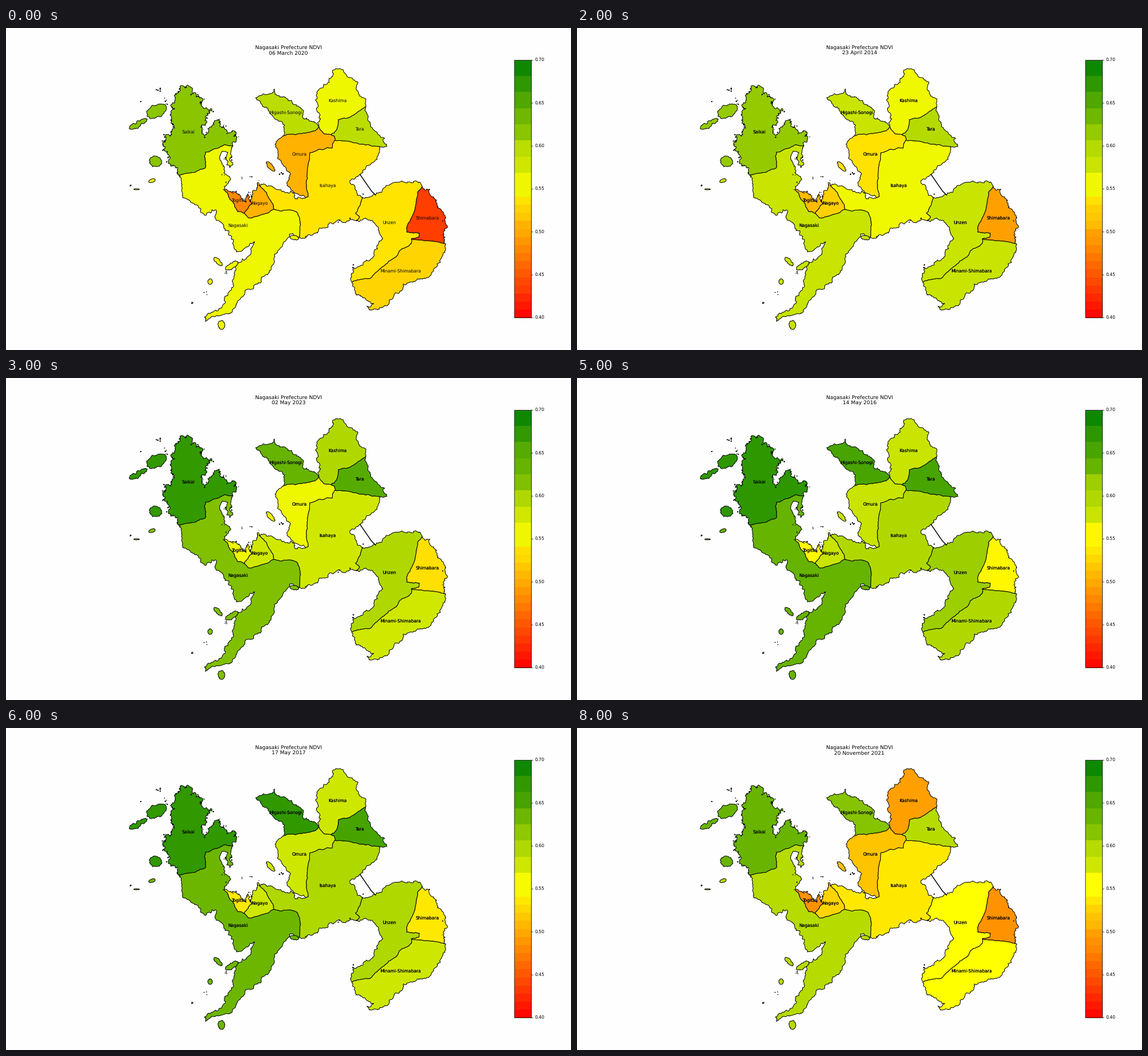
Recreate the animation shown at these times as a matplotlib script. Size 991 by 565 pixels, loop 9 s.

```python
import numpy as np
import matplotlib.pyplot as plt
from matplotlib.animation import FuncAnimation
from matplotlib.patches import Polygon, Rectangle

W, H, DPI = 991, 565, 64
PT = 72 / DPI  # points per pixel
BAR_X, BAR_W, BAR_TOP, BAR_BOTTOM = 0.9 * W, 0.03 * W, 0.1 * H, 0.9 * H

DATES = ["06 March 2020", "02 April 2018", "23 April 2014", "02 May 2023", "07 May 2019",
         "14 May 2016", "17 May 2017", "19 October 2015", "20 November 2021"]
KEYS = [0, 2, 3, 5, 7, 8]  # dates with known tones; the others lie between

plt.rcParams.update({"font.family": "DejaVu Sans", "text.hinting": "none"})
fig = plt.figure(figsize=(W / DPI, H / DPI), dpi=DPI, facecolor="#fefefe")
ax = fig.add_axes([0, 0, 1, 1])
ax.set(xlim=(0, W), ylim=(H, 0))
ax.axis("off")
rng = np.random.default_rng(7)


def rough(points, amp):
    """Roughen a polyline by repeated midpoint displacement."""
    out = [points[0]]

    def split(a, b):
        d = b - a
        size = np.hypot(*d)
        if size < 2.2:
            out.append(b)
            return
        shift = np.clip(amp * rng.normal(), -2 * amp, 2 * amp) * min(1, 12 / size)
        m = (a + b) / 2 + np.array([-d[1], d[0]]) * shift
        split(a, m)
        split(m, b)

    for a, b in zip(points[:-1], points[1:]):
        split(a, b)
    return np.array(out)


def blob(x, y, rx, ry, tilt):
    """Rough tilted ellipse for an island."""
    t = np.linspace(0, 2 * np.pi, 13)
    z = (rx * np.cos(t) + 1j * ry * np.sin(t)) * np.exp(1j * np.radians(tilt))
    return rough(np.column_stack([x + z.real, y + z.imag]), COAST)


arcs = {}
BORDER, COAST, RIAS = 0.07, 0.17, 0.27


def arc(name, amp, *xy):
    arcs[name] = rough(np.array(xy, float).reshape(-1, 2), amp)


def ring(names):
    """Join arcs end to end; a leading minus runs one backwards."""
    return np.vstack([arcs[n[1:]][::-1] if n[0] == "-" else arcs[n] for n in names.split()])


# Inland borders
arc("kas-tar", BORDER, 631, 138, 604, 156, 583, 161, 579, 180, 570, 187)
arc("kas-omu", BORDER, 570, 187, 558, 186, 549, 174)
arc("tar-omu", BORDER, 570, 187, 576, 190, 577, 197)
arc("tar-isa", BORDER, 577, 197, 606, 200, 622, 204, 655, 208)
arc("hig-omu", BORDER, 549, 174, 543, 180, 516, 185, 487, 189)
arc("omu-isa", BORDER, 525, 298, 530, 296, 527, 270, 533, 219, 548, 213, 572, 211, 577, 197)
arc("isa-unz", BORDER, 625, 297, 622, 307, 613, 325, 620, 331, 614, 338)
arc("isa-nag", BORDER, 515, 367, 514, 331, 508, 322, 497, 319, 484, 321, 470, 318)
arc("nyo-isa", BORDER, 470, 318, 468, 309, 446, 278)
arc("nyo-nag", BORDER, 418, 325, 425, 333, 447, 328, 470, 318)
arc("tog-nyo", BORDER, 418, 325, 432, 308, 428, 303)
arc("tog-nag", BORDER, 383, 284, 398, 305, 406, 322, 418, 325)
arc("sai-nag", BORDER, 398, 207, 383, 205, 350, 218, 349, 246, 335, 251, 303, 258)
arc("unz-shi", BORDER, 730, 278, 722, 288, 716, 322, 703, 349, 703, 358, 725, 360, 724, 367, 711, 370)
arc("shi-min", BORDER, 711, 370, 750, 374, 771, 379)
arc("unz-min", BORDER, 711, 370, 711, 378, 690, 391, 684, 402, 637, 440, 607, 446)

# Coasts and outer edges
arc("kas", COAST, 549, 174, 552, 160, 545, 113, 557, 99, 567, 95, 573, 74, 592, 76, 603, 87,
    616, 94, 614, 107, 631, 138)
arc("tar", COAST, 631, 138, 644, 178, 664, 194, 668, 208, 655, 208)
arc("hig", COAST, 487, 189, 485, 166, 462, 149, 438, 122, 466, 115, 471, 107, 480, 121, 501, 127,
    517, 140, 523, 160, 549, 174)
arc("omu", COAST, 487, 189, 474, 199, 476, 228, 496, 253, 499, 283, 525, 298)
arc("isa-e", COAST, 655, 208, 651, 230, 621, 257, 603, 268, 613, 284, 625, 297)
arc("isa-s", COAST, 614, 338, 579, 339, 538, 363, 515, 367)
arc("isa-n", COAST, 446, 278, 453, 274, 478, 284, 506, 291, 511, 300, 525, 298)
arc("nyo", COAST, 428, 303, 434, 285, 442, 271, 446, 278)
arc("tog", COAST, 383, 284, 400, 287, 421, 306, 424, 291, 428, 303)
arc("sai", RIAS, 303, 258, 301, 245, 285, 238, 276, 205, 280, 187, 291, 187, 289, 150, 296, 141,
    296, 128, 307, 101, 345, 124, 343, 135, 361, 142, 344, 177, 353, 185, 365, 166, 398, 180,
    404, 199, 398, 207)
arc("nag-n", COAST, 398, 207, 398, 240, 387, 240, 389, 218, 380, 216, 382, 248, 394, 266, 383, 284)
arc("nag-w", COAST, 303, 258, 308, 285, 349, 329, 368, 319, 368, 336, 395, 365, 404, 393,
    428, 378, 436, 375, 422, 405, 402, 419, 398, 450, 385, 480, 362, 499)
arc("nag-s", COAST, 362, 499, 348, 507, 350, 515, 362, 506, 395, 500, 419, 461, 448, 445,
    465, 424, 470, 405, 497, 362, 515, 367)
arc("unz-n", COAST, 625, 297, 648, 293, 672, 276, 718, 268, 730, 278)
arc("unz-w", COAST, 614, 338, 643, 338, 661, 370, 642, 404, 608, 424, 607, 446)
arc("shi", COAST, 730, 278, 742, 284, 770, 335, 774, 350, 768, 368, 771, 379)
arc("min", COAST, 771, 379, 754, 420, 738, 438, 697, 449, 690, 463, 672, 482, 638, 495,
    633, 488, 645, 484, 613, 466, 607, 446)

shapes, shades, labels = [], [], []


def region(name, x, y, tones, edge, islands=()):
    """Tones run 0 (red) through 255 (yellow) to 510 (green)."""
    shades.append(np.interp(range(len(DATES)), KEYS, tones))
    outlines = [ring(edge), *(blob(*i) for i in islands)]
    shapes.append([ax.add_patch(Polygon(o, ec="black", lw=PT, joinstyle="round")) for o in outlines])
    # The second copy thickens the label from the second date on
    labels.append([ax.text(x, y + 2.8, name, size=7.65 * PT, ha="center", va="baseline", zorder=5)
                   for _ in range(2)])


region("Saikai", 319.5, 182, [372, 361, 460, 464, 480, 406], "sai -sai-nag".replace("-sai-nag", "sai-nag"),
       [(264, 146, 19, 11, -28), (232, 168, 18, 5, -28), (262, 234, 11, 9, 10)])
region("Nagasaki", 407, 345.5, [272, 310, 382, 408, 394, 328],
       "nag-w nag-s isa-nag -nyo-nag -tog-nag -nag-n sai-nag",
       [(378, 521, 6, 8, 0), (372, 410, 10, 4, 45), (396, 417, 13, 5, -30), (358, 445, 4, 5, 0),
        (256, 268, 6, 3, -20), (506, 368, 8, 4, 10), (229, 283, 5, 1, 0)])
region("Higashi-Sonogi", 491, 148, [323, 310, 408, 438, 464, 376], "hig hig-omu")
region("Kashima", 582, 127, [272, 270, 334, 310, 298, 160], "kas kas-tar kas-omu")
region("Tara", 620, 177, [323, 330, 424, 438, 440, 328], "tar -tar-isa -tar-omu -kas-tar")
region("Omura", 515, 222, [176, 226, 272, 310, 298, 196], "omu omu-isa -tar-omu kas-omu hig-omu",
       [(464, 243, 11, 4, 48)])
region("Isahaya", 564.5, 276, [228, 270, 302, 334, 326, 232],
       "tar-isa isa-e isa-unz isa-s isa-nag nyo-isa isa-n omu-isa")
region("Togitsu", 408.5, 301.5, [136, 188, 272, 247, 220, 146], "tog -tog-nyo -tog-nag")
region("Nagayo", 444.5, 308, [180, 208, 302, 310, 272, 212], "nyo -nyo-isa -nyo-nag tog-nyo")
region("Unzen", 672, 341.5, [228, 310, 334, 354, 326, 255], "unz-n unz-shi unz-min -unz-w -isa-unz")
region("Shimabara", 739, 333, [62, 160, 224, 247, 212, 146], "shi -shi-min -unz-shi")
region("Minami-Shimabara", 692, 426, [212, 310, 302, 334, 298, 255], "shi-min min -unz-min")


def specks(points, spread):
    """Tiny islets scattered about the given points."""
    x, y = (points + rng.normal(0, spread, points.shape)).T
    ax.scatter(x, y, s=(rng.uniform(1.2, 2.6, len(x)) * PT) ** 2, c="black", lw=0)


for name, count in [("sai", 60), ("nag-n", 14), ("nyo", 10), ("tog", 8), ("shi", 8), ("isa-s", 5)]:
    specks(rng.choice(arcs[name], count), 2)
for x, y, count, spread in [(270, 109, 6, 3), (282, 128, 5, 4), (236, 129, 2, 1), (219, 276, 3, 1),
                            (414, 263, 2, 1), (428, 261, 2, 1), (484, 255, 4, 3), (626, 291, 1, 0),
                            (355, 465, 3, 3), (327, 481, 3, 1), (385, 431, 4, 3), (608, 421, 4, 2)]:
    specks(np.full((count, 2), (x, y)), spread)

# Sea dike
ax.plot([621, 641, 648], [257, 286, 293], color="black", lw=1.5 * PT)

# Colour bar: fine bands below yellow, wide ones above
edges = np.array([*range(0, 241, 16), *range(287, 480, 32), 510])
levels = BAR_BOTTOM - edges / 510 * (BAR_BOTTOM - BAR_TOP)
bands = [ax.add_patch(Rectangle((BAR_X, top), BAR_W, low - top, lw=0, antialiased=False))
         for low, top in zip(levels[:-1], levels[1:])]
ax.add_patch(Rectangle((BAR_X, BAR_TOP), BAR_W, BAR_BOTTOM - BAR_TOP, fill=False, ec="black",
                       lw=0.8 * PT, snap=False))
for i in range(7):
    y = BAR_BOTTOM - i / 6 * (BAR_BOTTOM - BAR_TOP)
    ax.plot([BAR_X + BAR_W, BAR_X + BAR_W + 2.7], [y, y], color="black", lw=0.7 * PT, snap=False)
    ax.text(927.2, y + 2.8, f"{0.4 + 0.05 * i:.2f}", size=7.65 * PT, va="baseline")

ax.text(W / 2, 37.1, "Nagasaki Prefecture NDVI", size=9.17 * PT, ha="center", va="baseline")
date = ax.text(W / 2, 46.5, "", size=9.17 * PT, ha="center", va="baseline")


def colour(s):
    return min(255, 510 - s) / 255, (s if s <= 255 else 255 - (s - 255) / 2) / 255, 0


def draw(k):
    now = np.array([tones[k] for tones in shades])
    slot = np.searchsorted(edges, now, side="right") - 1
    # Areas sharing a band share its mean tone
    tone = (edges[:-1] + edges[1:]) / 2
    for b in set(slot):
        tone[b] = now[slot == b].mean()
    for band, s in zip(bands, tone):
        band.set_facecolor(colour(s))
    for patches, b in zip(shapes, slot):
        for p in patches:
            p.set_facecolor(colour(tone[b]))
    for _, copy in labels:
        copy.set_visible(k > 0)
    date.set_text(DATES[k])
    return []


anim = FuncAnimation(fig, draw, frames=len(DATES), interval=1000, repeat=True, blit=False)
plt.show()
```
